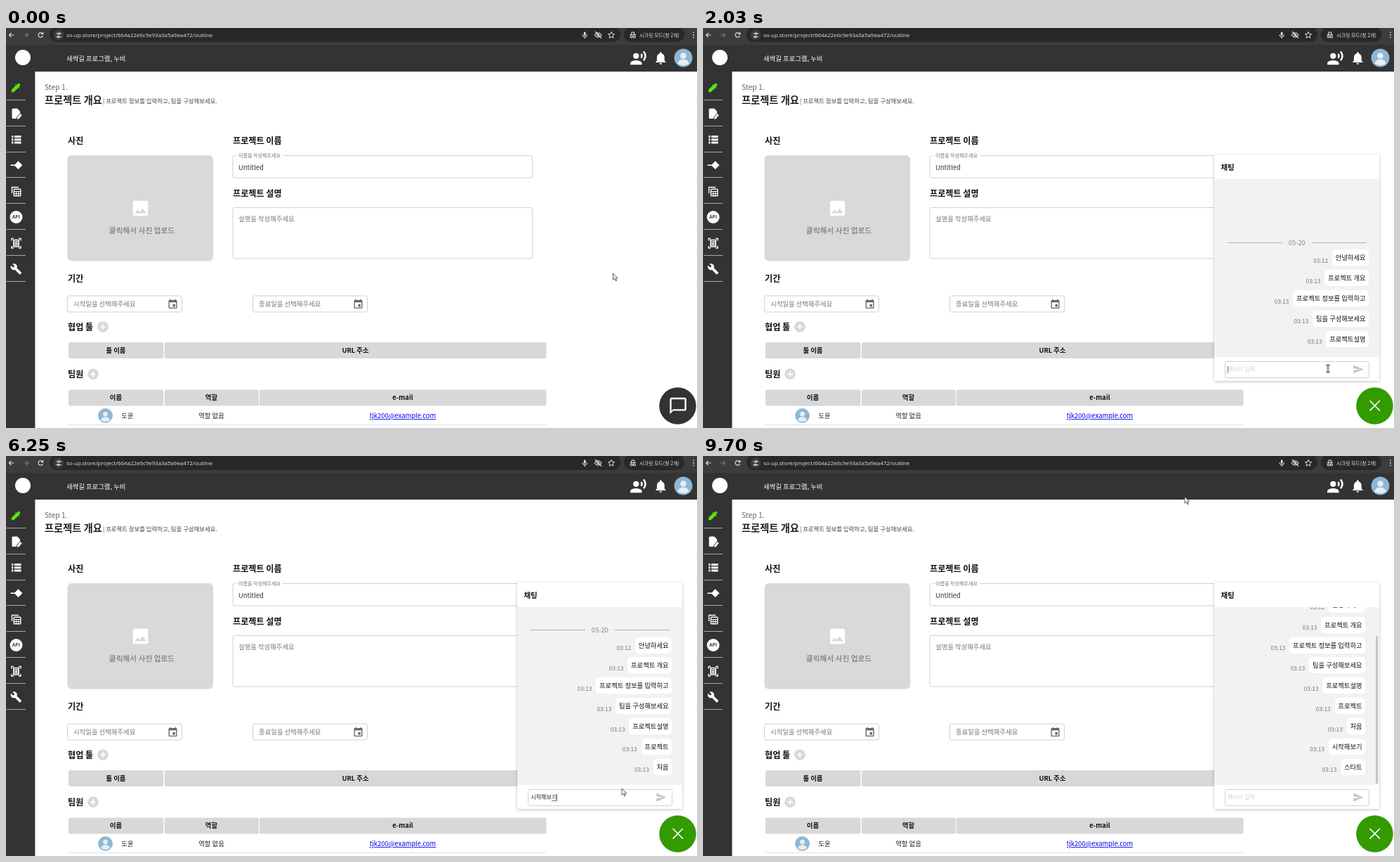
Recreate the animation shown at these times as an HTML page. Size 984 by 569 pixels, loop 9.77 s.

```html
<!DOCTYPE html>
<html>
<head>
<meta charset="utf-8">
<title>Project outline with chat</title>
<style>
html, body { margin: 0; width: 100%; height: 100%; overflow: hidden; background: #fff; }
body, text { font-family: "Noto Sans CJK KR", "Noto Sans CJK JP", "Noto Sans CJK SC", sans-serif; }
svg { position: absolute; left: 0; top: 0; overflow: hidden; }
#chat { position: absolute; left: 728px; top: 180px; width: 234.5px; height: 322px; background: #fff;
  transform-origin: 100% 488px; box-shadow: 0 1px 4px rgba(0,0,0,.25); visibility: hidden; }
#chat > * { position: absolute; }
#chat h2 { left: 9.5px; top: 1px; margin: 0; font-size: 10.4px; line-height: 34px; color: #111; }
#body { left: 0; top: 35px; width: 100%; height: 253px; background: #f2f2f2; overflow: hidden; }
#list { position: absolute; left: 0; right: 0; bottom: 11.4px; }
.scroll #list { right: 5px; }
.date { position: relative; top: .8px; display: flex; align-items: center; gap: 9px; height: 16px;
  padding: 0 18px 0 19px; font-size: 9.4px; line-height: 15px; color: #888; }
.date::before, .date::after { content: ""; flex: 1; height: 1px; background: #b0b0b0; }
.row { display: flex; justify-content: flex-end; align-items: center; height: 28.85px; padding-right: 14.2px; }
.row i { font: inherit; font-size: 8.4px; line-height: 12px; color: #777; margin: 6px 5.9px 0 0; }
.row b { font-weight: 400; font-size: 9.34px; line-height: 22px; height: 23px; padding: 0 4.7px; border-radius: 5px; background: #fff; color: #111; }
#thumb { position: absolute; right: 1.5px; width: 3px; bottom: 2px; border-radius: 1px; background: #c4c4c4; }
#field { left: 14.5px; top: 293.5px; width: 204px; height: 22px; border: 1px solid #d2d2d2; border-radius: 2.5px; }
#input { left: 19.3px; top: 294px; font-size: 8.05px; line-height: 22px; color: #222; white-space: pre; }
#input.empty { color: #d0d0d0; }
#input u { text-underline-offset: 1.5px; text-decoration: underline .6px #777; }
#caret { top: 300.5px; width: 1px; height: 10.5px; background: #777; }
</style>
</head>
<body>
<svg id="page" width="984" height="569" viewBox="0 0 984 569">
  <defs>
    <g id="avatar">
      <circle r="13" fill="#8fb7d4"/>
      <circle cy="-3" r="4.3" fill="#e3eef5"/>
      <path d="M-8 8.2C-7.2 0 7.2 0 8 8.2Q0 13.5-8 8.2Z" fill="#e3eef5"/>
    </g>
    <g id="plus"><circle r="7.8" fill="#d8d8d8"/><path d="M-4 0H4M0-4V4" stroke="#fff" stroke-width="1.7"/></g>
    <path id="cal" d="M17 12h-5v5h5v-5zM16 1v2H8V1H6v2H5c-1.11 0-2 .9-2 2v14c0 1.1.89 2 2 2h14c1.1 0 2-.9 2-2V5c0-1.1-.9-2-2-2h-1V1h-2zm3 18H5V8h14v11z" fill="#666"/>
  </defs>

  <rect width="984" height="24" fill="#3c3c3c"/>
  <rect x="62" y="-2" width="813" height="22" rx="11" fill="#282828"/>
  <rect x="880" y="-2" width="86" height="22" rx="11" fill="#282828"/>
  <rect y="24" width="984" height="38" fill="#333"/>
  <rect y="62" width="41.4" height="507" fill="#333"/>

  <g fill="none" stroke="#ddd" stroke-width="1.2">
    <path d="M11.5 10H4.5M7.5 7L4.5 10L7.5 13"/>
    <path d="M24.5 10H31.5M28.5 7L31.5 10L28.5 13" stroke="#777"/>
    <path d="M52 7.8A3.3 3.3 0 1 0 52.5 11M52.8 6V8.7H50"/>
    <circle cx="75" cy="10" r="7.5" fill="#3c3c3c" stroke="none"/>
    <path d="M71.5 8H74M77 8H79M71.5 12.5H73M76 12.5H79"/>
    <circle cx="75.5" cy="8" r="1.2"/><circle cx="74.5" cy="12.5" r="1.2"/>
    <rect x="822.8" y="5.5" width="2.8" height="5.5" rx="1.4" fill="#ddd" stroke="none"/>
    <path d="M821 9.5Q821.5 12.5 824.2 12.5Q827 12.5 827.5 9.5M824.2 12.5V15"/>
    <path d="M838 10Q843 3.5 848 10Q843 16.5 838 10M839 5L848 14.5"/><circle cx="843" cy="10" r="1.5"/>
    <path d="M862 5.3L863.3 8.4L866.6 8.7L864.1 10.9L864.9 14.2L862 12.4L859.1 14.2L859.9 10.9L857.4 8.7L860.7 8.4Z" stroke-width="1"/>
    <path d="M888.5 9.5H897M890.5 9L891.2 6H894.3L895 9"/>
    <circle cx="890.7" cy="12.5" r="1.5"/><circle cx="894.9" cy="12.5" r="1.5"/>
  </g>
  <path d="M979 5.5V14.5" stroke="#ddd" stroke-width="1.6" stroke-dasharray="1.6 2"/>

  <circle cx="24" cy="42" r="11" fill="#fff"/>
  <g fill="#fff">
    <g transform="translate(888 30.5) scale(1.03)"><circle cx="9" cy="9" r="4"/><path d="M9 15c-2.67 0-8 1.34-8 4v2h16v-2c0-2.66-5.33-4-8-4zm7.76-9.64l-1.68 1.69c.84 1.18.84 2.71 0 3.89l1.68 1.69c2.02-2.02 2.02-5.07 0-7.27zM20.07 2l-1.63 1.63c2.77 3.02 2.77 7.56 0 10.74L20.07 16c3.9-3.89 3.91-9.95 0-14z"/></g>
    <path transform="translate(921.5 32) scale(.9)" d="M12 22c1.1 0 2-.9 2-2h-4c0 1.1.89 2 2 2zm6-6v-5c0-3.07-1.64-5.64-4.5-6.32V4c0-.83-.67-1.5-1.5-1.5s-1.5.67-1.5 1.5v.68C7.63 5.36 6 7.92 6 11v5l-2 2v1h16v-1l-2-2z"/>
  </g>
  <use href="#avatar" x="964.5" y="42.5"/>

  <g id="side" stroke="#a8a8a8"></g>
  <path transform="translate(5.8 76.5) scale(.7)" fill="#5be312" d="M20.7 5.6l-2.3-2.3c-.4-.4-1-.4-1.4 0l-3.2 3.1-1.9-1.9-1.4 1.4 1.4 1.4L3 16.2V21h4.7l9-8.9 1.4 1.4 1.4-1.4-1.9-1.9 3.1-3.1c.4-.4.4-1 0-1.5z"/>
  <g fill="#fff" stroke="#333">
    <path stroke="none" d="M10 114.5H16L20 118.5V129H10Q8.5 129 8.5 127.5V116Q8.5 114.5 10 114.5Z"/>
    <path d="M15.5 130V127L20.5 121.5L23.3 124L18 130Z"/>
  </g>
  <path d="M8 154.5H10.5M12 154.5H21.5M8 158.7H10.5M12 158.7H21.5M8 162.9H10.5M12 162.9H21.5" stroke="#fff" stroke-width="3"/>
  <path d="M6.5 195.2H14" stroke="#fff" stroke-width="1.6"/><path d="M17.5 189.3L23.4 195.2L17.5 201.1L11.6 195.2Z" fill="#fff"/>
  <g fill="none" stroke="#fff" stroke-width="1.4">
    <path d="M8.5 235V226.5H18"/>
    <rect x="11.3" y="229.3" width="9.5" height="9.5" rx=".8"/>
    <path d="M11.3 232.5H20.8M11.3 235.6H20.8M14.5 232V238.5M17.7 232V238.5" stroke-width="1"/>
    <path d="M8 302.5V299.5H11M18 299.5H21V302.5M21 310V313H18M11 313H8V310"/>
    <path d="M11 301.5H18V311H11ZM12.5 304H16.5M12.5 306.3H16.5M12.5 308.6H16.5" stroke-width="1.7"/>
  </g>
  <circle cx="14.5" cy="269" r="9" fill="#fff"/>
  <path transform="translate(6 334.5) scale(.7)" fill="#fff" d="M22.7 19l-9.1-9.1c.9-2.3.4-5-1.5-6.9-2-2-5-2.4-7.4-1.3L9 6 6 9 1.6 4.7C.4 7.1.9 10.1 2.9 12.1c1.9 1.9 4.6 2.4 6.9 1.5l9.1 9.1c.4.4 1 .4 1.4 0l2.3-2.3c.5-.4.5-1.1.1-1.4z"/>

  <rect x="87.5" y="181" width="207.5" height="150.5" rx="6" fill="#d9d9d9"/>
  <path transform="translate(177.2 242.2) scale(1.19)" fill="#fff" d="M21 19V5c0-1.1-.9-2-2-2H5c-1.1 0-2 .9-2 2v14c0 1.1.9 2 2 2h14c1.1 0 2-.9 2-2zM8.5 13.5l2.5 3L14.5 12l4.5 6H5l3.5-4.5z"/>
  <g fill="#fff" stroke="#d0d0d0">
    <rect x="323" y="181.5" width="426.5" height="31.5" rx="2.5"/>
    <rect x="323" y="255.5" width="426.5" height="72.5" rx="2.5"/>
    <rect x="87.5" y="381" width="163" height="23" rx="2.5"/>
    <rect x="351.5" y="381" width="163" height="23" rx="2.5"/>
    <rect x="328" y="179" width="66" height="5" stroke="none"/>
  </g>
  <use href="#cal" transform="translate(229.5 385) scale(.67)"/>
  <use href="#cal" transform="translate(493.5 385) scale(.67)"/>
  <use href="#plus" x="138" y="425"/><use href="#plus" x="124" y="492.3"/>
  <g fill="#d8d8d8">
    <rect x="89" y="447" width="135.5" height="23" rx="2.5"/><rect x="226" y="447" width="543.5" height="23" rx="2.5"/>
    <rect x="89" y="514.5" width="135.5" height="23" rx="2.5"/><rect x="226" y="514.5" width="134" height="23" rx="2.5"/><rect x="361" y="514.5" width="408.5" height="23" rx="2.5"/>
  </g>
  <path d="M89 564.5H769" stroke="#e2e2e2"/>
  <use href="#avatar" transform="translate(141.5 551.5) scale(.8)"/>
  <g id="labels"></g>
</svg>

<div id="chat">
  <h2>채팅</h2>
  <div id="body"><div id="list"></div><div id="thumb"></div></div>
  <div id="field"></div>
  <div id="input"></div>
  <div id="caret"></div>
  <svg width="235" height="322"><path transform="translate(197 297.5) scale(.67)" fill="#c4c4c4" d="M2 21L23 12 2 3v7l15 2-15 2z"/></svg>
</div>

<svg width="984" height="569" viewBox="0 0 984 569">
  <circle id="fab" cx="956.5" cy="537.5" r="26.3"/>
  <path id="bubble" transform="translate(943 523.5) scale(1.17)" fill="#fff" d="M20 2H4c-1.1 0-2 .9-2 2v18l4-4h14c1.1 0 2-.9 2-2V4c0-1.1-.9-2-2-2zm0 14H6l-2 2V4h16v12z"/>
  <path id="cross" d="M949.5 530L963.9 544.4M963.9 530L949.5 544.4" stroke="#fff" stroke-width="1.6"/>
  <path id="arrow" d="M0 0V9.3L2.2 7.3L3.8 10.8L5.2 10.2L3.6 6.8H6.6Z" fill="#fff" stroke="#333" stroke-width=".8"/>
  <path id="beam" d="M-2.8-5H-.7L0-4.5L.7-5H2.8M0-4.5V4.5M-2.8 5H-.7L0 4.5L.7 5H2.8" fill="none" stroke="#222" stroke-width="1.1"/>
</svg>

<script>
const LOOP = 9770;
const $ = id => document.getElementById(id);
const NS = 'http://www.w3.org/2000/svg';

// y is the visual middle of the glyphs
function label(x, y, size, text, fill = '#111', attrs = {}) {
  const el = document.createElementNS(NS, 'text');
  const all = { x, y: y + size * .37, 'font-size': size, fill, ...attrs };
  for (const k in all) el.setAttribute(k, all[k]);
  el.textContent = text;
  $('labels').append(el);
}
const bold = { 'font-weight': 700 };
const mid = { 'text-anchor': 'middle' };
const head = { ...bold, ...mid };

label(86, 10, 7.9, 'so-up.store/project/664a22e6c9e93a3a5a9ea472/outline', '#e4e4e4', { style: 'font-family:"Open Sans",sans-serif' });
label(902, 10, 7, '시크릿 모드(창 2개)', '#e4e4e4');
label(86, 43.3, 9.4, '새싹길 프로그램, 누비', '#fff', { 'font-weight': 500 });
label(14.5, 269, 6.6, 'API', '#333', head);
label(55, 84, 10.3, 'Step 1.', '#666');
label(55, 102.3, 14.25, '프로젝트 개요', '#222', bold);
label(138, 104, 8.4, '| 프로젝트 정보를 입력하고, 팀을 구성해보세요.', '#444');
[[88, 160.7, '사진'], [323, 160.7, '프로젝트 이름'], [323, 235.5, '프로젝트 설명'], [88, 356.5, '기간'],
 [88, 425.7, '협업 툴'], [88, 492.7, '팀원']].forEach(([x, y, s]) => label(x, y, 12.1, s, '#111', bold));
label(331, 181, 7.05, '이름을 작성해주세요', '#777');
label(331, 198.4, 9.4, 'Untitled', '#333');
label(331, 271.7, 9.4, '설명을 작성해주세요', '#777');
label(193.5, 288, 10.7, '클릭해서 사진 업로드', '#666', mid);
label(96, 393, 9.4, '시작일을 선택해주세요', '#777');
label(360, 393, 9.4, '종료일을 선택해주세요', '#777');
[[156.5, 459, '툴 이름'], [497.5, 459, 'URL 주소'], [156.5, 526, '이름'], [292.5, 526, '역할'],
 [565, 526, 'e-mail']].forEach(([x, y, s]) => label(x, y, 9.4, s, '#111', head));
label(173, 551.8, 9.4, '도윤', '#222', mid);
label(292.5, 551.8, 9.4, '역할 없음', '#222', mid);
label(565, 551.8, 9.4, 'tjk200@example.com', '#00e', { ...mid, 'text-decoration': 'underline' });

for (let i = 0; i < 8; i++) {
  const line = document.createElementNS(NS, 'path');
  line.setAttribute('d', `M1 ${102.5 + Math.round(i * 36.8)}H28`);
  $('side').append(line);
}

const OPEN = 1020, FOCUS = 1960, BLUR = 8800;
const messages = ['안녕하세요', '프로젝트 개요', '프로젝트 정보를 입력하고', '팀을 구성해보세요', '프로젝트설명',
  '프로젝트', '처음', '시작해보기', '스타트'];
const sends = [4620, 5290, 6580, 7660];

// [first key, last key, successive input states]
const typing = [
  [2230, 2890, 'ㅍ 프 플'],
  [3090, 3350, '프로 프롲 프로제 프로젝ㅌ'],
  [3550, 4490, '프로젝트 프로젝 프로 프 프ㄹ 프로 프롲 프로제 프로젝 프로젝ㅌ 프로젝트'],
  [4720, 5200, 'ㅊ 처 청 처으 처음'],
  [5630, 6250, '시 시자 시작 시작ㅎ 시작해 시작햅 시작해보 시작해복 시작해보기'],
  [6980, 7450, 'ㅅ 스 슽 스타 스탙 스타트']
];
const keys = sends.map(t => [t, '']);
for (const [a, b, s] of typing) {
  const states = s.split(' ');
  states.forEach((v, i) => keys.push([a + (b - a) * i / (states.length - 1), v]));
}
keys.sort((p, q) => p[0] - q[0]);

// [time, x, y] of the pointer tip
const path = [[190, 864.5, 349], [420, 890, 415], [800, 950, 532], [1020, 952, 534], [1210, 899, 520],
  [1480, 891, 490], [1680, 890, 484.5], [2180, 890, 484.5], [2230, 877, 473], [8120, 877, 473],
  [8350, 925, 400], [8700, 830, 240], [9010, 723, 121], [9140, 730, 127], [9350, 704, 82], [9560, 683, 51], [9700, 686, 58]];

function pointer(t) {
  if (t <= path[0][0]) return path[0].slice(1);
  const i = path.findIndex(p => p[0] > t);
  if (i < 0) return path[path.length - 1].slice(1);
  const [t0, x0, y0] = path[i - 1], [t1, x1, y1] = path[i];
  const k = (t - t0) / (t1 - t0);
  return [x0 + (x1 - x0) * k, y0 + (y1 - y0) * k];
}

const show = (id, on) => $(id).style.visibility = on ? 'visible' : 'hidden';

let count = 0;
function drawList(n) {
  if (n === count) return;
  count = n;
  $('list').innerHTML = '<div class="date">05-20</div>' + messages.slice(0, n).map((m, i) =>
    `<div class="row"><i>03:1${i ? 3 : 2}</i><b>${m}</b></div>`).join('');
  $('body').className = n > 7 ? 'scroll' : '';
  $('thumb').style.height = (n > 8 ? 210 : n > 7 ? 232 : 0) + 'px';
}

let typed = null;
function drawInput(text) {
  if (text === typed) return;
  typed = text;
  $('input').className = text ? '' : 'empty';
  $('input').innerHTML = text ? text.slice(0, -1) + `<u>${text.slice(-1)}</u>` : '메시지 입력';
  $('caret').style.left = 19 + text.length * .92 * 8.05 + 'px';
}

function draw(t) {
  const open = t >= OPEN;
  $('fab').setAttribute('fill', open ? '#339a00' : '#333');
  show('bubble', !open);
  show('cross', open);
  show('chat', open);
  const scale = t > 1700 ? 1 : 1 - Math.exp((OPEN - t) / 66);
  $('chat').style.transform = open && scale < 1 ? `scale(${scale})` : 'none';

  drawList(5 + sends.filter(s => t >= s).length);
  const past = keys.filter(k => t >= k[0]);
  drawInput(past.length ? past[past.length - 1][1] : '');
  $('caret').style.display = t >= FOCUS && t < BLUR ? 'block' : 'none';

  const beam = t >= 1500 && t < 2200;
  const [x, y] = pointer(t);
  show('beam', beam);
  show('arrow', !beam);
  $(beam ? 'beam' : 'arrow').setAttribute('transform', `translate(${x} ${y})`);
}

const start = performance.now();
function tick() {
  draw((performance.now() - start) % LOOP);
  requestAnimationFrame(tick);
}
tick();
</script>
</body>
</html>
```
